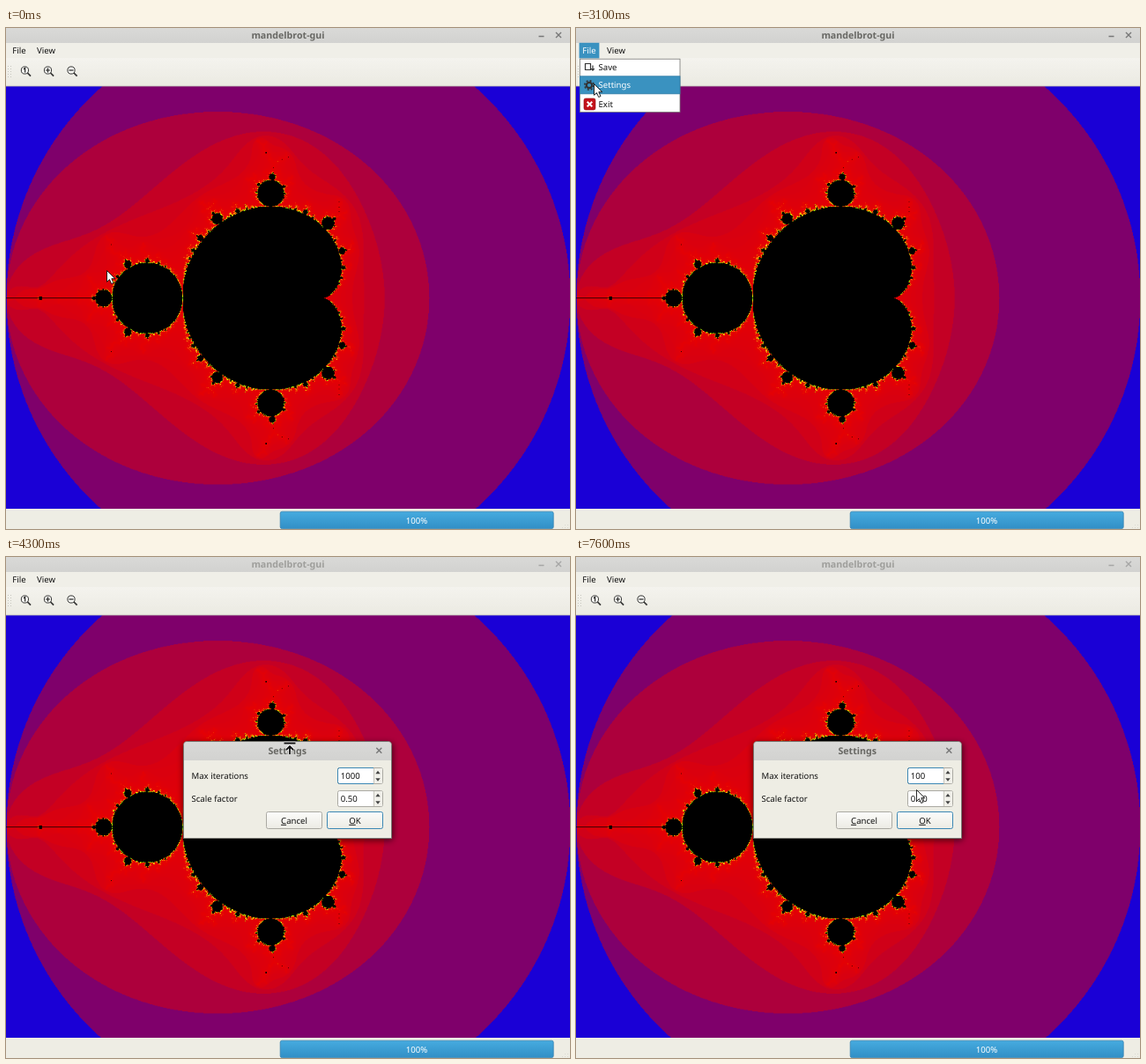
These frames come from a looping animation (640x569 px, 8000 ms). An HTML page with a canvas:

```html
<!DOCTYPE html>
<html lang="en">
<head>
<meta charset="utf-8">
<title>mandelbrot-gui</title>
<style>
html, body { margin: 0; width: 100%; height: 100%; overflow: hidden; background: #eeede4; }
canvas, svg { position: absolute; left: 0; top: 0; display: block; }
canvas { top: 66px; }
text { font: 9.6px "Noto Sans", "Open Sans", sans-serif; fill: #111; text-rendering: geometricPrecision; white-space: pre; }
.title { font-size: 10.67px; font-weight: bold; text-anchor: middle; fill: #686864; }
.mid { text-anchor: middle; }
.light { fill: #fff; }

/* 1.25% of the loop is one 100 ms step */
.anim { animation: 8s step-end infinite; }
#bar { animation-name: blur; }
#file { animation-name: file; }
#fileText { animation-name: fileText; }
#menu { animation-name: menu; transform-origin: 0 35px; }
#saveHover { animation-name: saveHover; }
#setHover { animation-name: setHover; }
#saveText { animation-name: saveText; }
#setText { animation-name: setText; }
#dialog { animation-name: dialog; transform-origin: 320px 264px; }
#caret { animation-name: caret; }
#long { animation-name: long; }
#short { animation-name: short; }
#pointer { animation-name: move; }
#arrow { animation-name: arrow; }
#resize { animation-name: resize; }
#beam { animation-name: beam; }

@keyframes blur { 0% { opacity: 1 } 46.25%, 100% { opacity: .5 } }
@keyframes file { 0% { opacity: 0 } 30% { opacity: 1 } 40%, 100% { opacity: 0 } }
@keyframes fileText { 0% { fill: #111 } 30% { fill: #fff } 40%, 100% { fill: #111 } }
@keyframes menu {
  0% { opacity: 0; transform: scaleY(.85) }
  31.25% { opacity: .15; transform: scaleY(.87) }
  32.5% { opacity: .4; transform: scaleY(.94) }
  33.75% { opacity: .75; transform: scaleY(.98) }
  35% { opacity: 1; transform: none }
  40% { opacity: .35; transform: none }
  41.25% { opacity: .2; transform: none }
  42.5% { opacity: .1; transform: none }
  43.75%, 100% { opacity: 0; transform: none }
}
@keyframes saveHover { 0% { opacity: 0 } 36.25% { opacity: 1 } 37.5%, 100% { opacity: 0 } }
@keyframes setHover { 0% { opacity: 0 } 37.5%, 100% { opacity: 1 } }
@keyframes saveText { 0% { fill: #111 } 36.25% { fill: #fff } 37.5%, 100% { fill: #111 } }
@keyframes setText { 0% { fill: #111 } 37.5%, 100% { fill: #fff } }
@keyframes dialog {
  0% { opacity: 0; transform: scaleY(.3) }
  46.25% { opacity: .2; transform: scaleY(.3) }
  47.5% { opacity: .54; transform: scaleY(.58) }
  48.75% { opacity: .82; transform: scaleY(.86) }
  50%, 100% { opacity: 1; transform: none }
}
@keyframes caret {
  0% { opacity: 0; transform: none }
  60% { opacity: 1; transform: none }
  66.25% { opacity: 0; transform: none }
  72.5% { opacity: 1; transform: none }
  78.75% { opacity: 0; transform: none }
  80% { opacity: 1; transform: translateX(5.5px) }
  86.25% { opacity: 0; transform: translateX(5.5px) }
  88.75% { opacity: 1; transform: translateX(5.5px) }
  95%, 100% { opacity: 0; transform: translateX(5.5px) }
}
@keyframes long { 0% { opacity: 1 } 88.75%, 100% { opacity: 0 } }
@keyframes short { 0% { opacity: 0 } 88.75%, 100% { opacity: 1 } }
@keyframes move {
  0% { transform: translate(114px, 275px) }
  17.5% { transform: translate(114px, 275px); animation-timing-function: steps(2) }
  20% { transform: translate(123px, 256px); animation-timing-function: steps(2) }
  22.5% { transform: translate(110px, 195px); animation-timing-function: steps(2) }
  25% { transform: translate(72px, 108px); animation-timing-function: steps(2) }
  27.5% { transform: translate(28px, 42px) }
  28.75% { transform: translate(19px, 22px) }
  33.75% { transform: translate(19px, 26px) }
  35% { transform: translate(19px, 33px); animation-timing-function: steps(2) }
  37.5% { transform: translate(20px, 56px) }
  38.75% { transform: translate(20px, 63px) }
  40% { transform: translate(19px, 67px) }
  47.5% { transform: translate(19px, 67px) }
  48.75% { transform: translate(42px, 80px); animation-timing-function: steps(2) }
  51.25% { transform: translate(205px, 165px) }
  52.5% { transform: translate(285px, 202px) }
  53.75% { transform: translate(322px, 217px) }
  55% { transform: translate(341px, 232px) }
  56.25% { transform: translate(356px, 243px); animation-timing-function: steps(3) }
  60% { transform: translate(382px, 249px); animation-timing-function: steps(5) }
  66.25%, 100% { transform: translate(386px, 264px) }
}
@keyframes arrow { 0% { opacity: 1 } 53.75% { opacity: 0 } 55% { opacity: 1 } 58.75% { opacity: 0 } 63.75%, 100% { opacity: 1 } }
@keyframes resize { 0% { opacity: 0 } 53.75% { opacity: 1 } 55%, 100% { opacity: 0 } }
@keyframes beam { 0% { opacity: 0 } 58.75% { opacity: 1 } 63.75%, 100% { opacity: 0 } }
</style>
</head>
<body>
<canvas id="set" width="640" height="481"></canvas>
<svg width="640" height="569" viewBox="0 0 640 569">
  <defs>
    <linearGradient id="gTitle" x2="0" y2="1"><stop stop-color="#d9d9d7"/><stop offset="1" stop-color="#d2d2d0"/></linearGradient>
    <linearGradient id="gTool" x2="0" y2="1"><stop stop-color="#f4f3ee"/><stop offset="1" stop-color="#ebeae2"/></linearGradient>
    <linearGradient id="gBlue" x2="0" y2="1"><stop stop-color="#46abdf"/><stop offset="1" stop-color="#318fc6"/></linearGradient>
    <linearGradient id="gButton" x2="0" y2="1"><stop stop-color="#fcfcfa"/><stop offset="1" stop-color="#ecebe4"/></linearGradient>
    <filter id="shadow" x="-10%" y="-15%" width="120%" height="135%"><feGaussianBlur stdDeviation="3.5"/></filter>
    <g id="lens" fill="none" stroke="#333">
      <circle r="4.1" stroke-width="1" fill="#f8f8f4"/>
      <path d="M3 3 6.600 6.600" stroke-width="1.700"/>
    </g>
    <g id="spin">
      <rect x="376.5" y="239.5" width="51" height="18" rx="2" fill="#fff" stroke="#aaa9a2"/>
      <path d="M417.5 240h8.500a1 1 0 0 1 1 1v15a1 1 0 0 1-1 1h-8.500z" fill="#f1f0ea"/>
      <path d="M417.500 240v17" stroke="#c4c3bc"/>
      <path d="M419.300 246.200h5.400l-2.700-3.400zM419.300 251.300h5.400l-2.700 3.400z" fill="#444"/>
    </g>
  </defs>

  <!-- window frame -->
  <rect width="640" height="17" fill="url(#gTitle)"/>
  <g id="bar" class="anim">
    <text class="title" x="320" y="12">mandelbrot-gui</text>
    <path d="M604.500 9.500h6M624 5l6 6m0-6-6 6" stroke="#777" stroke-width="1.400"/>
  </g>
  <rect y="17" width="640" height="17" fill="#f0efe8"/>
  <rect y="34" width="640" height="32" fill="url(#gTool)"/>
  <path d="M0 66h640" stroke="#bdbcb4" stroke-width=".8"/>
  <rect id="file" class="anim" x="3.600" y="16.800" width="22.800" height="17.600" fill="#3a92c0"/>
  <text id="fileText" class="anim" x="7.300" y="28.500">File</text>
  <text x="35" y="28.500">View</text>
  <path d="M2.500 43v13M5.500 43v13" stroke="#c9c8c0" stroke-dasharray="1 2"/>
  <g stroke="#222" stroke-width="1.200" fill="none">
    <use href="#lens" x="21.400" y="48"/><path d="M20 46.800 21.600 45.500v5"/>
    <use href="#lens" x="47.500" y="48"/><path d="M45 48h5M47.500 45.500v5"/>
    <use href="#lens" x="74" y="48"/><path d="M71.500 48h5"/>
  </g>

  <!-- status bar -->
  <rect y="546.400" width="640" height="22.600" fill="#eeede4"/>
  <rect x="311.200" y="549.200" width="310" height="19.400" rx="2" fill="url(#gBlue)" stroke="#3583b2" stroke-width=".8"/>
  <text class="mid light" x="466" y="562.500">100%</text>
  <path d="M631 567.500h7M634 564.500h4" stroke="#dad9d1" stroke-dasharray="1 2"/>

  <g id="menu" class="anim">
    <rect x="4.400" y="35.200" width="113.600" height="60.400" fill="#fff" stroke="#777773" stroke-width=".8"/>
    <rect id="saveHover" class="anim" x="4.800" y="35.600" width="112.800" height="19.200" fill="#3a92c0"/>
    <rect id="setHover" class="anim" x="4.400" y="54.800" width="113.600" height="20" fill="#3a92c0" stroke="#2f7ba6" stroke-width=".8"/>
    <path d="M16.500 47.500h-6v-7h6zM19 42.500v5.500M17.200 46.200 19 48.200l1.800-2" fill="none" stroke="#333" stroke-width="1.200"/>
    <circle cx="15" cy="65" r="3.200" fill="none" stroke="#333" stroke-width="2.200"/>
    <circle cx="15" cy="65" r="5.200" fill="none" stroke="#333" stroke-width="1.600" stroke-dasharray="2 2.084"/>
    <rect x="9" y="80" width="13" height="13" rx="2" fill="#c4141c" stroke="#8f0a10" stroke-width=".6"/>
    <path d="m12.700 83.700 5.600 5.600m0-5.600-5.600 5.600" stroke="#fff" stroke-width="2"/>
    <text id="saveText" class="anim" x="25.500" y="47.800">Save</text>
    <text id="setText" class="anim" x="25.500" y="68">Settings</text>
    <text x="25.500" y="89.800">Exit</text>
  </g>

  <g id="dialog" class="anim">
    <rect x="201" y="211" width="238" height="111" rx="4" opacity=".6" filter="url(#shadow)"/>
    <path d="M201.500 319.500v-106a4 4 0 0 1 4-4h228a4 4 0 0 1 4 4v106z" fill="#eeede4" stroke="#777772"/>
    <path d="M202 231v-17.500a3.500 3.500 0 0 1 3.500-3.500h228a3.500 3.500 0 0 1 3.500 3.500V231z" fill="url(#gTitle)"/>
    <text class="title" x="319.300" y="224.300">Settings</text>
    <path d="m420.300 216.800 6 6m0-6-6 6" stroke="#777" stroke-width="1.400"/>
    <text x="210.500" y="252.300">Max iterations</text>
    <text x="210.500" y="277.800">Scale factor</text>
    <use href="#spin"/>
    <path d="M417 239.500h-38.500a2 2 0 0 0-2 2v14a2 2 0 0 0 2 2H417" fill="none" stroke="#3b87b4"/>
    <use href="#spin" y="26"/>
    <text id="long" class="anim" x="379.700" y="252.300">1000</text>
    <text id="short" class="anim" x="379.700" y="252.300">100</text>
    <text x="379.700" y="277.800">0.50</text>
    <path id="caret" class="anim" d="M380 242v14" stroke="#111"/>
    <rect x="295.500" y="289.500" width="63" height="19" rx="2" fill="url(#gButton)" stroke="#aaa9a2"/>
    <rect x="364.500" y="289.500" width="63" height="19" rx="2" fill="url(#gButton)" stroke="#3b87b4"/>
    <text class="mid" x="327" y="302.800"><tspan text-decoration="underline">C</tspan>ancel</text>
    <text class="mid" x="396" y="302.800"><tspan text-decoration="underline">O</tspan>K</text>
  </g>

  <g id="pointer" class="anim">
    <path id="arrow" class="anim" d="M.5.500v12.800l3-2.700 2.200 4.900 2.300-1-2.200-4.800h4z" fill="#fff" stroke="#111" stroke-width=".9"/>
    <g id="resize" class="anim" fill="none">
      <path d="M-6.500-5.500h13M0 7V-2M-4 2l4-4 4 4" stroke="#fff" stroke-width="3.600"/>
      <path d="M-6.500-5.500h13M0 7V-2M-4 2l4-4 4 4" stroke="#111" stroke-width="1.800"/>
    </g>
    <path id="beam" class="anim" d="M-2.500-6.500h5M0-6.500v13M-2.500 6.500h5" fill="none" stroke="#111"/>
  </g>
</svg>
<script>
const MAX = 1000, W = 800, H = 600, UNIT = 200;
const bands = [[26, 0, 214], [127, 0, 107], [173, 0, 60], [196, 0, 36], [208, 0, 24]];

function escapeTime(a, b) {
  const q = (a - .25) ** 2 + b * b;
  if (q * (q + a - .25) <= b * b / 4 || (a + 1) ** 2 + b * b <= 1 / 16) return MAX;
  let x = a, y = b, n = 0;
  while (n < MAX && x * x + y * y <= 4) {
    const next = x * x - y * y + a;
    y = 2 * x * y + b;
    x = next;
    n++;
  }
  return n;
}

// red fades in as blue fades out; slow escapes turn yellow, then green
function shade(n) {
  if (n >= MAX) return [0, 0, 0];
  if (n < bands.length) return bands[n];
  const blue = 96 / (n + 1), green = Math.max(0, n - 50) * 2;
  return [n > 300 ? 150 : 232 - blue + green / 10, green, blue];
}

const big = document.createElement("canvas");
big.width = W;
big.height = H;
const bigCtx = big.getContext("2d");
const img = bigCtx.createImageData(W, H), px = img.data;
for (let y = 0, i = 0; y < H; y++) {
  for (let x = 0; x < W; x++, i += 4) {
    px.set(shade(escapeTime((x - W / 2) / UNIT, (y - H / 2) / UNIT)), i);
    px[i + 3] = 255;
  }
}
bigCtx.putImageData(img, 0, 0);

// the 800 x 600 view is shown at 80%
const ctx = document.getElementById("set").getContext("2d");
ctx.imageSmoothingQuality = "high";
ctx.drawImage(big, 0, .4, 640, 480);
</script>
</body>
</html>
```
